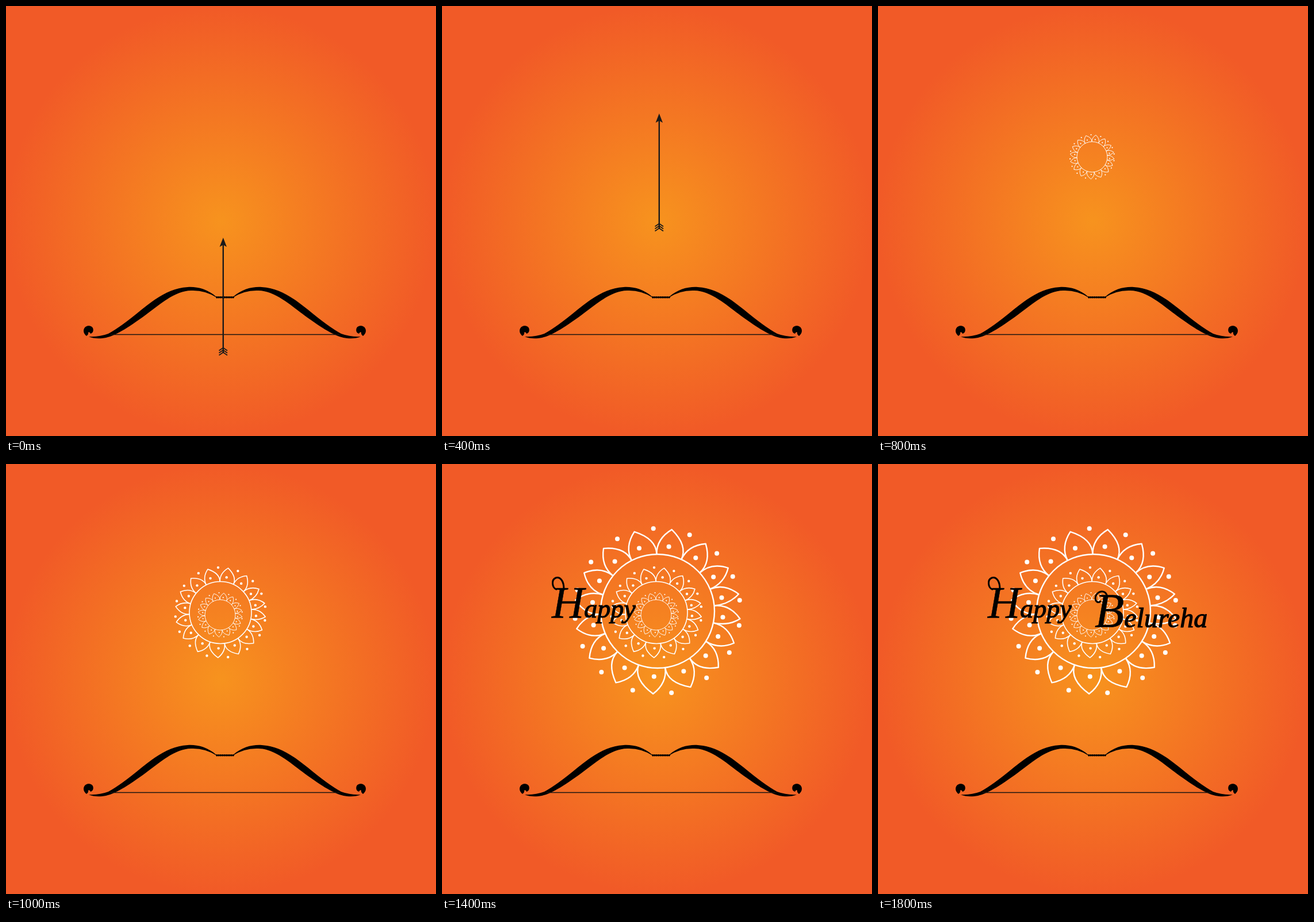
An HTML page that plays this animation: 748 px wide and 748 px high, repeating every 2000 ms.

```html
<!DOCTYPE html>
<html lang="en">
<head>
<meta charset="utf-8">
<title>Festival greeting</title>
<style>
  html, body { margin: 0; width: 100%; height: 100%; overflow: hidden; background: #f15a27; }
  svg { display: block; width: 100%; height: 100%; }
  text {
    font: italic 46px "Liberation Serif", "Noto Serif", serif;
    stroke: #000; stroke-width: 1.2; stroke-linejoin: round;
  }
  .cap { stroke-width: 0.5; }
  .swash { fill: none; stroke: #000; stroke-width: 3; stroke-linecap: round; }
</style>
</head>
<body>
<svg viewBox="0 0 748 748">
  <defs>
    <radialGradient id="glow" gradientUnits="userSpaceOnUse" cx="374" cy="374" r="374">
      <stop offset="0" stop-color="#f7931e"/>
      <stop offset="1" stop-color="#f15a27"/>
    </radialGradient>
    <g id="limb">
      <path d="M366 506C350 492 332 488 316 489C284 491 260 509 236 528Q200 558 178 570Q162 576 144 575C152 579 164 579 174 577C192 573 218 556 246 535C270 517 296 495 322 495Q346 494 366 507Z"/>
      <path d="M140 574C135 570 134 565 136 561C139 555 148 555 151 560C153 565 151 569 147 570Q145 566 143 568Q144 571 140 574Z"/>
    </g>
    <path id="vane" d="M370.5 599.5L377.8 594.5L385 599.5" fill="none" stroke-width="1.7"/>
  </defs>
  <rect width="748" height="748" fill="url(#glow)"/>

  <g id="rings" fill="none" stroke="#fff" stroke-linejoin="round"></g>

  <g id="bow">
    <use href="#limb"/>
    <use href="#limb" transform="translate(761 0) scale(-1 1)"/>
    <path d="M182 571.5H580" stroke="#1a1410" stroke-width="1.6"/>
    <path d="M365 506.7H397" stroke="#000" stroke-width="2"/>
    <path d="M366 506.7H396" stroke="#000" stroke-width="3.6" stroke-dasharray="2 1.2"/>
  </g>

  <g id="arrow" fill="#1a1a1a" stroke="#1a1a1a">
    <path d="M377.8 414V604" stroke-width="2.4"/>
    <path d="M377.8 403L384 419L377.8 415.5L371.6 419Z" stroke="none"/>
    <use href="#vane"/>
    <use href="#vane" y="4"/>
    <use href="#vane" y="8"/>
  </g>

  <g id="word1">
    <text x="191" y="267"><tspan class="cap" font-size="78">H</tspan>appy</text>
    <path class="swash" d="M212 218C212 202 205 196 198 198C190 201 191 215 199 218"/>
  </g>
  <g id="word2">
    <text x="377" y="284"><tspan class="cap" font-size="84">B</tspan><tspan font-size="48">elureha</tspan></text>
    <path class="swash" d="M399 231C396 218 384 220 379 229C376 238 382 243 387 239"/>
  </g>
</svg>
<script>
const $ = id => document.getElementById(id);
const STEP = 200, LOOP = 2000;
const PETALS = 16, R = 99, SEED = 114, TIP = 144;

const at = (deg, r) => {
  const a = deg * Math.PI / 180;
  return [r * Math.cos(a), r * Math.sin(a)].map(v => v.toFixed(1));
};

// Two slow waves make the spacing uneven, like a hand drawing
const sway = i => {
  const a = i * 2 * Math.PI / PETALS;
  return i * 360 / PETALS + 5.5 * Math.sin(2 * a) + 3.6 * Math.cos(a + 0.35);
};
const tipAngle = i => sway(i) - 83.5;
const jointAngle = i => sway(i) - 94.3;

const dot = (deg, r) => {
  const [x, y] = at(deg, r);
  return `<circle cx="${x}" cy="${y}" r="4" fill="#fff" stroke="none"/>`;
};

function petal(i) {
  const a = jointAngle(i), b = jointAngle(i + 1), tip = tipAngle(i), bulge = R + 27;
  return `<path d="M${at(a, R)}Q${at(a, bulge)} ${at(tip, TIP)}Q${at(b, bulge)} ${at(b, R)}"/>` +
    dot(tip, SEED) + dot(a - 2, TIP);
}

let flower = `<circle r="${R}"/>`;
for (let i = 0; i < PETALS; i++) flower += petal(i);

const rings = [
  { x: 372.5, y: 262.5, r: 26.5, line: 0.95 },
  { x: 373, y: 258.5, r: 54, line: 1.6 },
  { x: 375, y: 256, r: 99, line: 2.4 }
];
$('rings').innerHTML = rings.map(({ x, y, r, line }, i) => {
  const s = r / R;
  return `<g id="ring${i}" transform="translate(${x} ${y}) scale(${s})" stroke-width="${line / s}">${flower}</g>`;
}).join('');

const lift = [0, 74, 216, 378];   // arrow height, one per step

function show(id, on) {
  $(id).setAttribute('visibility', on ? 'visible' : 'hidden');
}

function draw(ms) {
  const step = Math.floor(ms % LOOP / STEP);
  show('arrow', step < lift.length);
  $('arrow').setAttribute('transform', `translate(0 ${-(lift[step] ?? 0)})`);
  rings.forEach((_, i) => show('ring' + i, step >= lift.length + i));
  show('word1', step >= 7);
  show('word2', step >= 8);
}

let start;
function tick(now) {
  start ??= now;
  draw(now - start);
  requestAnimationFrame(tick);
}
draw(0);
requestAnimationFrame(tick);
</script>
</body>
</html>
```
